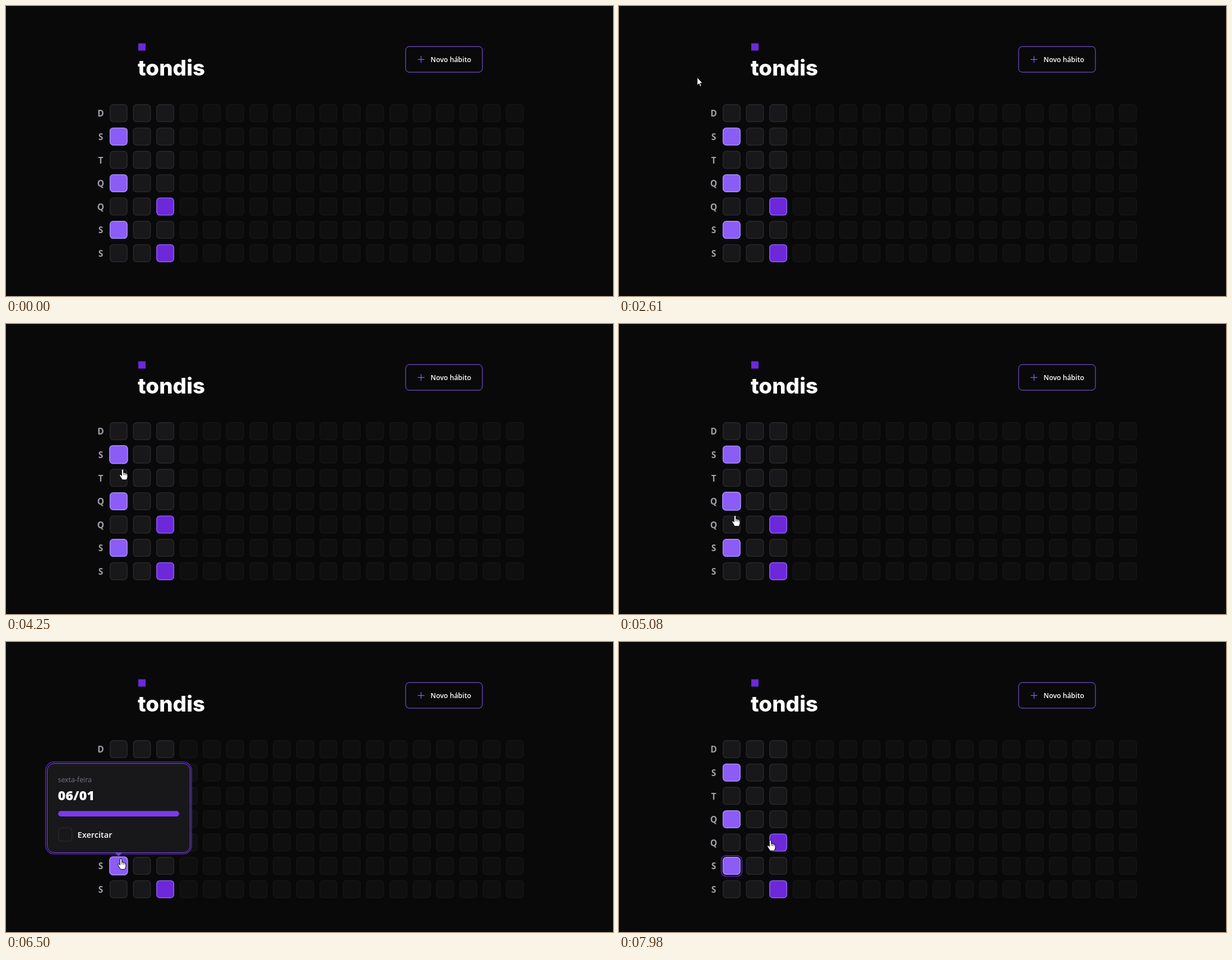
These frames come from a looping animation (1083 px wide and 517 px high, 8000 ms). An HTML page:

```html
<!DOCTYPE html>
<html lang="pt-BR">
<head>
<meta charset="utf-8">
<title>tondis</title>
<style>
  html, body { margin: 0; width: 100%; height: 100%; overflow: hidden; background: #09090a; }
  svg { display: block; width: 1083px; height: 517px; font-family: "Open Sans", "Noto Sans", sans-serif; }
  .day { font-size: 15.5px; font-weight: 700; fill: #a1a1aa; text-anchor: middle; }
  .brand { font: 800 38.5px Inter, sans-serif; fill: #fff; }
  .label { font-weight: 600; fill: #fff; }
  .ring { fill: none; stroke: #5b21b6; stroke-width: 1.6; }
</style>
</head>
<body>
<svg viewBox="0 0 1083 517">
  <rect x="236" y="66.5" width="13" height="13" fill="#6d28d9"/>
  <text class="brand" x="235" y="124">tondis</text>

  <rect x="713" y="72.3" width="137" height="45.7" rx="6.4" fill="none" stroke="#8b5cf6"/>
  <path d="M734.5 95.3h12M740.5 89.3v12" stroke="#8b5cf6" stroke-width="1.2"/>
  <text class="label" x="757.5" y="100" font-size="12.3">Novo hábito</text>

  <g id="grid"></g>

  <g id="popover">
    <rect id="popRing" class="ring" x="70.6" y="213.8" width="260.4" height="164" rx="15"/>
    <path d="M194.5 375.5h12.8l-6.4 6.4z" fill="#7c3aed"/>
    <rect x="73.5" y="216.5" width="255" height="159" rx="12.5" fill="#18181b" stroke="#7c4dee"/>
    <text x="92.5" y="250" font-size="12.4" fill="#7a7580">sexta-feira</text>
    <text class="label" x="92.5" y="282" font-size="23.5" style="font-weight:800">06/01</text>
    <rect x="93" y="301.3" width="216" height="9.7" rx="4.85" fill="#7c3aed"/>
    <rect x="93.8" y="331.2" width="24" height="24" rx="5.6" fill="#18181b" stroke="#27272a" stroke-width="1.6"/>
    <text class="label" x="127.5" y="349" font-size="14.6">Exercitar</text>
  </g>

  <circle id="press" cx="205" cy="386" r="10" fill="#e6d23c" fill-opacity=".6"/>

  <g id="cursor" stroke="#000" stroke-linejoin="round">
    <path id="arrow" fill="#fff" stroke-width=".8"
      d="M0 0V14L3.2 11 5.3 16 7.4 15.1 5.3 10.3H9.5Z"/>
    <g id="hand">
      <path fill="#fff" d="M-1.7 1.2Q0-1 1.7 1.2V6.6Q3.4 5.7 4.4 7.2 6.2 6.4 7 8.1 8.8 7.7 9 9.6V14L7.4 19.2H-.6L-5.3 11.6Q-5.5 9.3-3.5 9.8L-1.7 11.6Z"/>
      <path fill="none" stroke-width=".8" d="M1.7 7v3.5M4.4 7.5V11M7 8.5v2.7"/>
    </g>
  </g>
</svg>

<script>
const $ = id => document.getElementById(id);
const LOOP = 8000, PITCH = 41.6, LEFT = 184.9, TOP = 175.1, SIZE = 32;

// Day grid: three past columns, the rest is dimmed
const styles = {
  empty: ['#18181b', '#27272a'],
  mid: ['#6d28d9', '#8b5cf6'],
  full: ['#8b5cf6', '#a78bfa']
};
const done = { '0,1': 'full', '0,3': 'full', '0,5': 'full', '2,4': 'mid', '2,6': 'mid' };

function tile(col, row) {
  const [fill, stroke] = styles[done[[col, row]] || 'empty'];
  const ring = col === 0 && row === 5
    ? '<rect id="tileRing" class="ring" x="-18.4" y="-18.4" width="36.8" height="36.8" rx="8.8"/>' : '';
  const x = LEFT + col * PITCH + SIZE / 2, y = TOP + row * PITCH + SIZE / 2;
  return `<g transform="translate(${x} ${y})" opacity="${col < 3 ? 1 : 0.4}"><g id="t${col}-${row}">
    <rect x="-15.2" y="-15.2" width="30.4" height="30.4" rx="5.6"
      fill="${fill}" stroke="${stroke}" stroke-width="1.6"/>${ring}</g></g>`;
}

let markup = '';
[...'DSTQQSS'].forEach((day, row) => {
  markup += `<text class="day" x="169" y="${197.3 + row * PITCH}">${day}</text>`;
  for (let col = 0; col < 18; col++) markup += tile(col, row);
});
$('grid').innerHTML = markup;

// Pointer moves: start, end, number of steps, destination
const moves = [
  [110, 860, 12, 175, 161],
  [950, 950, 1, 180, 163],
  [1000, 1620, 9, 136, 124],
  [2610, 3030, 7, 201, 185],
  [3380, 3660, 5, 214, 229],
  [3860, 4390, 7, 206.5, 266],
  [4590, 5220, 10, 207, 350],
  [5360, 5910, 9, 205, 386],
  [7700, 7980, 5, 270, 353]
];

function pointer(t) {
  let x = 1056, y = 503;
  for (const [start, end, steps, toX, toY] of moves) {
    if (t < start) break;
    const step = t >= end ? steps : Math.floor((t - start) / (end - start) * (steps - 1)) + 1;
    const p = step / steps, eased = p * p * (3 - 2 * p);
    x += (toX - x) * eased;
    y += (toY - y) * eased;
  }
  return [x, y];
}

const within = (v, start) => v >= start - 2 && v <= start + SIZE + 2;
const during = (t, start, end) => t >= start && t < end;
const show = (id, on) => $(id).setAttribute('visibility', on ? 'inherit' : 'hidden');

function draw(t) {
  const [x, y] = pointer(t);
  $('cursor').setAttribute('transform', `translate(${x} ${y})`);
  show('cursor', t >= 110);
  show('hand', t >= 2950);
  show('arrow', t < 2950);

  // Hover reacts slightly later than the pointer
  const [hx, hy] = pointer(t - 130);
  for (let row = 0; row < 7; row++) {
    const hover = within(hx, LEFT) && within(hy, TOP + row * PITCH);
    $('t0-' + row).setAttribute('transform', `scale(${hover ? 1.05 : 1})`);
  }

  show('press', during(t, 6290, 6500) || during(t, 7360, 7510));
  show('popover', during(t, 6500, 7510));
  show('popRing', during(t, 6500, 7360));
  show('tileRing', during(t, 6290, 6500) || t >= 7360);
}

// Hidden parents must also hide the parts nested in them
const origin = performance.now();
function frame() {
  draw((performance.now() - origin) % LOOP);
  requestAnimationFrame(frame);
}
draw(0);
requestAnimationFrame(frame);
</script>
</body>
</html>
```
